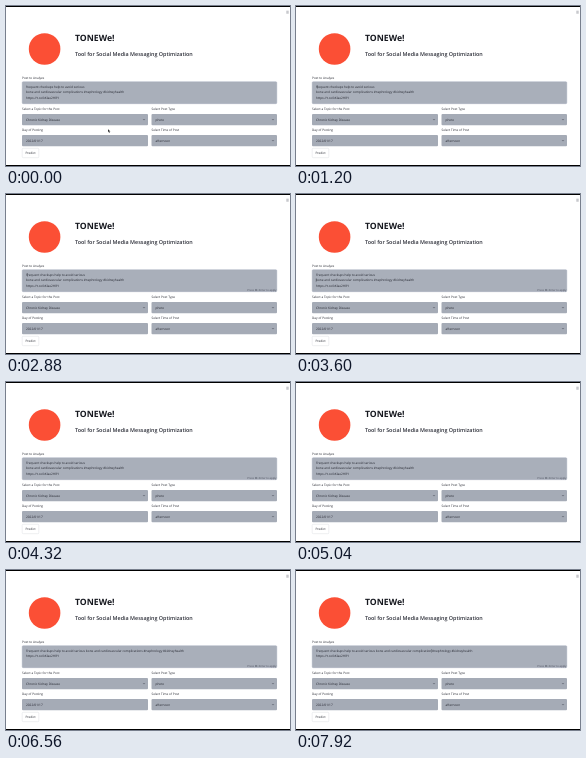
Write an HTML page that moves like this. It is 284 px wide and 160 px high and loops after 8000 ms.

```html
<!DOCTYPE html>
<html lang="en">
<head>
<meta charset="utf-8">
<title>Post form</title>
<style>
html, body { margin: 0; width: 100%; height: 100%; overflow: hidden; background: #fff; }
svg { display: block; width: 284px; height: 160px; }
text { font: 3.15px "Open Sans", "Noto Sans", sans-serif; fill: #23252e; text-rendering: geometricPrecision; }
.title { font-size: 8.7px; font-weight: 700; fill: #16181f; }
.sub { font-size: 5.4px; font-weight: 600; fill: #2c2e38; }
.box { fill: #a5abb6; }
.area { fill: #a9afba; stroke: #a0a8b8; stroke-width: .4; }
.hint { font-size: 2.7px; fill: #4b505e; text-anchor: end; }
.chev { fill: none; stroke: #3c404d; stroke-width: .5; }
</style>
</head>
<body>
<svg viewBox="0 0 284 160">
  <rect width="284" height="160" fill="#000"/>
  <rect y="1" width="284" height="158" fill="#fff"/>
  <path d="M280.3 5.2h2.4M280.3 6.2h2.4M280.3 7.2h2.4" stroke="#777a83" stroke-width=".45"/>
  <circle cx="38.6" cy="43" r="15.8" fill="#fb4f35"/>
  <text class="title" x="69" y="34.6">TONEWe!</text>
  <text class="sub" x="69" y="50.4">Tool for Social Media Messaging Optimization</text>

  <text x="16" y="72.8">Post to Analyze</text>
  <rect class="area" x="16.2" y="75.7" width="254.6" height="22" rx="1"/>
  <text class="line" x="20" y="81.9"></text>
  <text class="line" x="20" y="87.3"></text>
  <text class="line" x="20" y="92.7"></text>
  <rect id="caret" width=".3" height="3.6" fill="#23252e"/>
  <text class="hint" id="hint" x="270.4" y="96.6">Press ⌘+Enter to apply</text>

  <g id="fields"></g>

  <rect x="16.2" y="142.3" width="16.6" height="9.4" rx="1" fill="#fff" stroke="#d5d7dc" stroke-width=".4"/>
  <text x="24.5" y="148.2" text-anchor="middle">Predict</text>

  <path id="arrow" d="M0 0v3.4l.8-.7.6 1.3.6-.3-.6-1.2h1.1z" fill="#111" stroke="#fff" stroke-width=".25"/>
</svg>
<script>
const LOOP = 8000;
const $ = id => document.getElementById(id);
const lines = [...document.querySelectorAll('.line')];

function field(x, y, w, label, value, chevron) {
  const cx = x + w - 4;
  return `<text x="${x}" y="${y - 3.5}">${label}</text>
    <rect class="box" x="${x}" y="${y}" width="${w}" height="11.3" rx="1"/>
    <text x="${x + 4}" y="${y + 6.7}">${value}</text>` +
    (chevron ? `<path class="chev" d="M${cx - 1} ${y + 5.2}l1 1 1-1"/>` : '');
}
$('fields').innerHTML =
  field(16, 107.9, 126, 'Select a Topic for the Post', 'Chronic Kidney Disease', true) +
  field(145.5, 107.9, 125.5, 'Select Post Type', 'photo', true) +
  field(16, 128.9, 126, 'Day of Posting', '2022/01/17', false) +
  field(145.5, 128.9, 125.5, 'Select Time of Post', 'afternoon', true);

const head = 'requent checkups help to avoid serious';
const heart = 'bone and cardiovascular complication';
const tags = ' #nephrology #kidneyhealth';
const link = 'https://t.co/kKlae2HRY';
const split = first => [first + head, heart + 's' + tags, link];
const joined = (gap, plural) => ['F' + head + gap + heart + plural + tags, link, ''];
const seam = head.length + 1;
const end = seam + 1 + heart.length;

// [start time, lines, caret row, caret column]
const steps = [
  [0, split('f'), -1, 0],
  [850, split('f'), 0, 1],
  [1360, split(''), 0, 0],
  [1760, split('F'), 0, 1],
  [3280, split('F'), 1, 0],
  [5680, joined('', 's'), 0, seam],
  [6000, joined(' ', 's'), 0, seam + 1],
  [6960, joined(' ', 's'), 0, end + 1],
  [7520, joined(' ', ''), 0, end]
];

function show(el, on) { el.setAttribute('visibility', on ? 'visible' : 'hidden'); }

function draw(now) {
  const t = now % LOOP;
  const [start, text, row, col] = steps.filter(s => s[0] <= t).pop();
  lines.forEach((el, i) => {
    if (el.textContent !== text[i]) el.textContent = text[i];
  });
  show($('hint'), t >= 1360);

  const lit = row >= 0 && (t - start) % 1060 < 530;
  show($('caret'), lit);
  if (lit) {
    const dx = col ? lines[row].getSubStringLength(0, col) : 0;
    $('caret').setAttribute('x', 19.9 + dx);
    $('caret').setAttribute('y', 79.1 + row * 5.4);
  }

  const p = Math.min(1, Math.max(0, (t - 160) / 600));
  const e = p * p * (3 - 2 * p);
  $('arrow').setAttribute('transform', `translate(${102 - 79 * e} ${123 - 43 * e})`);
  show($('arrow'), t < 850);
}

function tick() {
  draw(performance.now());
  requestAnimationFrame(tick);
}
tick();
</script>
</body>
</html>
```
